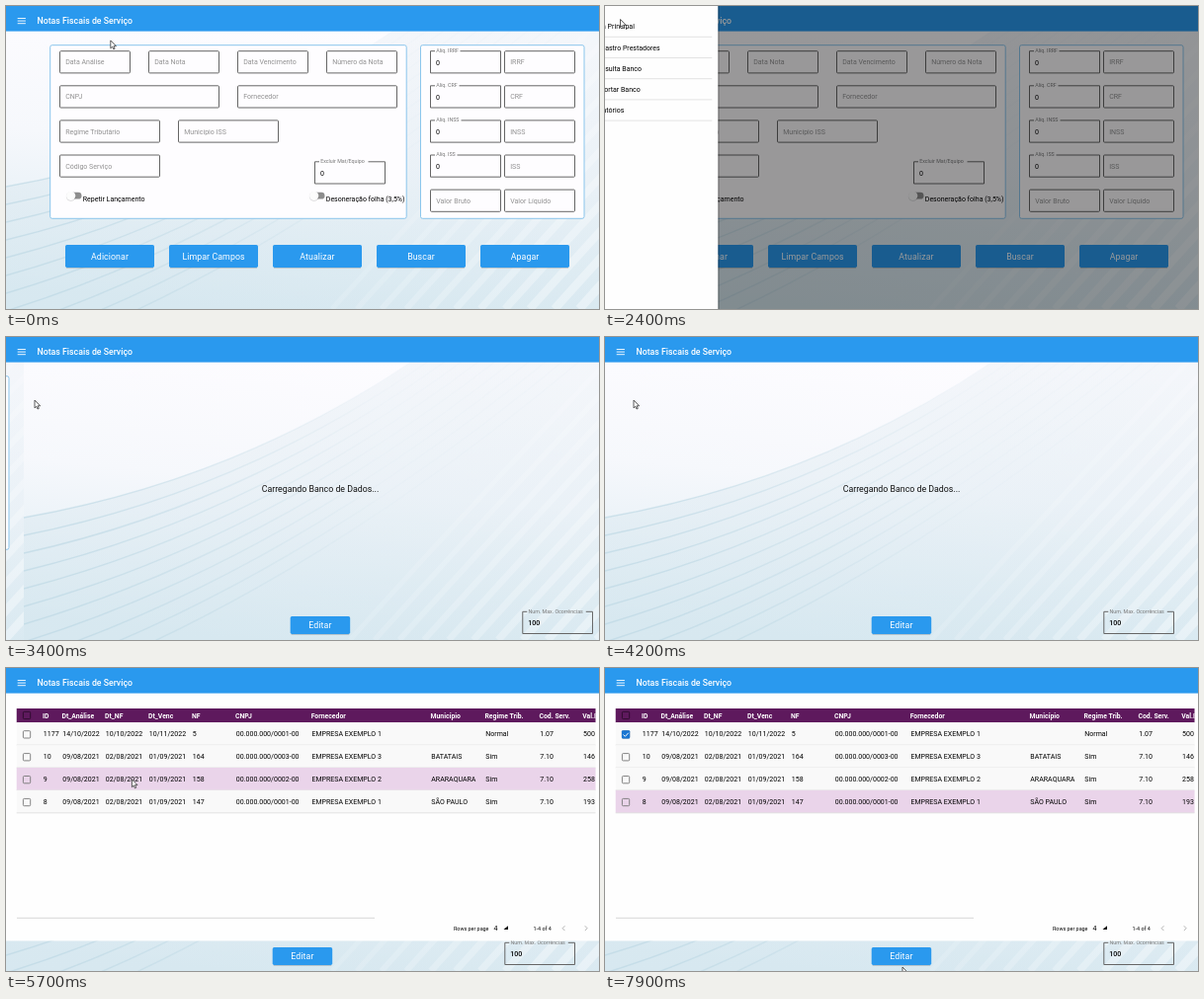
These frames come from a looping animation (600x307 px, 8000 ms). An HTML page:

```html
<!DOCTYPE html>
<html lang="pt-BR">
<head>
<meta charset="utf-8">
<title>Notas Fiscais de Serviço</title>
<style>
  html, body { margin: 0; width: 100%; height: 100%; overflow: hidden; background: #fff; }
  svg { display: block; width: 600px; height: 307px; font-family: Roboto, sans-serif; font-size: 7.03px; cursor: default; }
  .panel { fill: #fefdff; stroke: #7fc0ea; stroke-width: .9; }
  .field { fill: none; stroke: #666; }
  .hint { fill: #929292; }
  .label { fill: #777; font-size: 5.3px; }
  .button rect { fill: #2a99ee; }
  .button.over rect { fill: #1d6fb0; }
  .button text { fill: #fff; font-size: 8.8px; letter-spacing: .08px; text-anchor: middle; }
  .head { fill: #fff; font-size: 6.85px; font-weight: 700; }
  .row.over .fill { fill: #ead4ea; }
  .row .fill { fill: #f9f9f9; }
  .box { fill: none; stroke: #777; stroke-width: .9; }
  .small { font-size: 5.4px; }
</style>
</head>
<body>
<svg id="stage" viewBox="0 0 600 307"></svg>
<script>
const LOOP = 8000, DRAWER = 143, OPEN = 2300, LEAVE = 3200, LOADED = 4400, CHECKED = 7300;

const range = (n, f) => Array.from({ length: n }, (_, i) => f(i)).join('');
const text = (x, y, s, cls = '') => `<text x="${x}" y="${y}" class="${cls}">${s}</text>`;
const rect = (x, y, w, h, fill, extra = '') =>
  `<rect x="${x}" y="${y}" width="${w}" height="${h}" fill="${fill}" ${extra}/>`;
const rowY = i => 45.7 + i * 35.1;

const hintField = (x, y, w, hint) =>
  `<rect class="field" x="${x}" y="${y}" width="${w}" height="22.2" rx="1"/>` + text(x + 5.7, y + 13.6, hint, 'hint');

// Outlined field whose top border leaves a gap for the label.
const valueField = (x, y, w, label, gap, value, weight = 400) =>
  `<path class="field" d="M${x + gap + 7} ${y}H${x + w}V${y + 22.2}H${x}V${y}H${x + 4.5}"/>` +
  text(x + 5.7, y + 1.3, label, 'label') +
  `<text x="${x + 5.5}" y="${y + 14}" font-weight="${weight}">${value}</text>`;

const button = (x, y, w, h, label) =>
  `<g class="button" data-box="${[x, y, x + w, y + h]}">
    <path d="M${x + 1} ${y + h + .3}h${w - 2}" stroke="#000" stroke-opacity=".2"/>
    <rect x="${x}" y="${y}" width="${w}" height="${h}" rx="1.7"/>${text(x + w / 2, y + h / 2 + 3.2, label)}</g>`;

const toggle = (x, label) =>
  rect(x + 1, 188.8, 14, 6.8, '#8d8d8d', 'rx="3.4"') +
  `<circle cx="${x + 4.2}" cy="193" r="4.9" fill="#000" opacity=".12"/>
   <circle cx="${x + 4.2}" cy="192.3" r="4.6" fill="#fcfcfc"/>` + text(x + 16.3, 197.6, label);

function backdrop() {
  const bands = range(16, i => {
    const x = 330 + i * 25;
    return `<path d="M${x} 307Q${x + 105} 190 ${x + 260} 25" stroke="#fff" stroke-width="${5 + i * .4}" opacity="${.12 + i * .025}"/>`;
  });
  const curves = range(11, i => {
    const y = 183 + i * 18;
    const d = `M0 ${y}Q${215 + i * 6} ${y - 38 - i * 6} ${392 + i * 17} 25`;
    return `<path d="${d}" stroke="#bcd8e3" stroke-width="1.4" opacity=".65"/>`;
  });
  return `<g id="bg" clip-path="url(#body)">${rect(0, 25, 600, 282, 'url(#sky)')}
    <path d="M0 183Q215 145 392 25H600V307H0Z" fill="url(#haze)"/>
    <g fill="none"><g clip-path="url(#below)">${bands}</g><g mask="url(#fade)">${curves}</g></g></g>`;
}

function form() {
  const fields = [
    [54.5, 0, 71, 'Data Análise'], [144.5, 0, 71, 'Data Nota'],
    [234.5, 0, 71, 'Data Vencimento'], [324.5, 0, 71, 'Número da Nota'],
    [54.5, 1, 161, 'CNPJ'], [234.5, 1, 161, 'Fornecedor'],
    [54.5, 2, 101, 'Regime Tributário'], [174.5, 2, 101, 'Município ISS'],
    [54.5, 3, 101, 'Código Serviço'],
    [429.5, 4, 71, 'Valor Bruto'], [504.5, 4, 71, 'Valor Líquido']
  ];
  const taxes = [['IRRF', 23], ['CRF', 22], ['INSS', 24], ['ISS', 20]];
  return `<use href="#bg"/>
    <rect class="panel" x="44.7" y="39.7" width="360.5" height="175.6" rx="2"/>
    <rect class="panel" x="419.5" y="39.7" width="165.5" height="175.6" rx="2"/>` +
    fields.map(([x, row, w, hint]) => hintField(x, rowY(row), w, hint)).join('') +
    taxes.map(([name, gap], i) =>
      valueField(429.5, rowY(i), 71, 'Alíq. ' + name, gap, '0') + hintField(504.5, rowY(i), 71, name)).join('') +
    valueField(312.5, 157.8, 71, 'Excluir Mat/Equipo', 47, '0') +
    toggle(61.5, 'Repetir Lançamento') + toggle(307.5, 'Desoneração folha (3,5%)') +
    ['Adicionar', 'Limpar Campos', 'Atualizar', 'Buscar', 'Apagar']
      .map((s, i) => button(60 + i * 105, 242, 90, 23, s)).join('');
}

function table() {
  const cols = [37, 56.5, 100, 144, 188, 232, 308.7, 429.5, 484.5, 539.5, 583.3];
  const heads = 'ID,Dt_Análise,Dt_NF,Dt_Venc,NF,CNPJ,Fornecedor,Município,Regime Trib.,Cod. Serv.,Val.Bruto'.split(',');
  const rows = [
    '1177,14/10/2022,10/10/2022,10/11/2022,5,1,1,,Normal,1.07,500',
    '10,09/08/2021,02/08/2021,01/09/2021,164,3,3,BATATAIS,Sim,7.10,146',
    '9,09/08/2021,02/08/2021,01/09/2021,158,2,2,ARARAQUARA,Sim,7.10,258',
    '8,09/08/2021,02/08/2021,01/09/2021,147,1,1,SÃO PAULO,Sim,7.10,193'
  ];
  const body = rows.map((line, r) => {
    const y = 55.2 + r * 22.9;
    const cells = line.split(',').map((v, c) => {
      const s = c === 5 ? `00.000.000/000${v}-00` : c === 6 ? `EMPRESA EXEMPLO ${v}` : v;
      return text(cols[c] + .8, y + 13.9, s);
    }).join('');
    return `<g class="row"><rect class="fill" x="10.5" y="${y}" width="586.5" height="22.9"/>
      <path d="M10.5 ${y + 22.9}H597" stroke="#dedede" stroke-width=".8"/>
      <rect class="box" x="17.4" y="${y + 8.5}" width="7.3" height="7.3" rx="1"/>${cells}</g>`;
  }).join('');
  return rect(0, 25, 600, 251.5, '#fefefe') +
    `<g clip-path="url(#cells)">${rect(10.5, 41, 586.5, 14.2, '#5e195d')}
      <rect class="box" style="stroke:#2b0b2b" x="17.4" y="44.3" width="7.3" height="7.3" rx="1"/>
      ${heads.map((s, c) => text(cols[c], 51, s, 'head')).join('')}${body}</g>
    <g id="tick">${rect(16.9, 63.2, 8.3, 8.3, '#1976d2', 'rx="1"')}
      <path d="M18.6 67.5l1.8 1.8 3.4-3.6" fill="none" stroke="#fff"/></g>
    <path d="M11 253.3H373" stroke="#cfcfcf" stroke-width=".8"/>` +
    text(453, 265.8, 'Rows per page', 'small') + text(493.6, 266.3, '4') +
    text(533.5, 265.8, '1-4 of 4', 'small') +
    `<path d="M503.5 265L508 261.2V265Z"/>
    <path d="M565.4 261.3l-2.3 2.4 2.3 2.4M585.8 261.3l2.3 2.4-2.3 2.4" fill="none" stroke="#aaa" stroke-width=".9"/>`;
}

const menu = ['Tela Principal', 'Cadastro Prestadores', 'Consulta Banco', 'Exportar Banco', 'Relatórios'];

document.getElementById('stage').innerHTML = `
  <defs>
    <linearGradient id="sky" x1=".6" y1="0" x2=".4" y2="1">
      <stop offset="0" stop-color="#fdfcff"/><stop offset=".45" stop-color="#f6f8fc"/><stop offset="1" stop-color="#dcebf2"/>
    </linearGradient>
    <linearGradient id="haze" x2="0" y2="1">
      <stop offset="0" stop-color="#dfe9f0" stop-opacity=".3"/><stop offset="1" stop-color="#d2e5ee" stop-opacity=".5"/>
    </linearGradient>
    <linearGradient id="ramp"><stop offset=".1" stop-color="#fff"/><stop offset=".6" stop-color="#111"/></linearGradient>
    <mask id="fade" maskUnits="userSpaceOnUse" x="0" y="0" width="600" height="420">${rect(0, 0, 600, 420, 'url(#ramp)')}</mask>
    <clipPath id="body">${rect(0, 25, 600, 282, '#000')}</clipPath>
    <clipPath id="below"><path d="M0 183Q215 145 392 25H600V307H0Z"/></clipPath>
    <clipPath id="cells">${rect(10.5, 41, 586, 107, '#000')}</clipPath>
    ${backdrop()}
  </defs>
  <g id="form">${form()}</g>
  <g id="list"><use href="#bg"/>
    <text id="loading" x="300" y="156.8" font-size="8.8" text-anchor="middle" fill="#111">Carregando Banco de Dados...</text>
    ${valueField(504.8, 278.3, 70.7, 'Num. Max. Ocorrências', 57, '100', 500)}
    ${button(269.7, 283, 60.5, 18, 'Editar')}
    <g id="table">${table()}</g>
  </g>
  ${rect(0, 0, 600, 25.6, '#2a99ee')}
  <path d="M11.7 12.5h8.2m-8.2 2.6h8.2m-8.2 2.6h8.2" stroke="#fff" stroke-width=".9"/>
  <text x="31.5" y="18" fill="#fff" font-size="8.75" font-weight="500">Notas Fiscais de Serviço</text>
  <rect id="shade" width="600" height="307"/>
  <g id="drawer">
    ${rect(0, 0, DRAWER + 1.5, 307, '#000', 'opacity=".2"')}${rect(0, 0, DRAWER, 307, '#fefefe')}
    ${menu.map((s, i) => text(16.5, 23.3 + i * 21.2, s) +
      `<path d="M6 ${31.3 + i * 21.2}H${DRAWER - 6}" stroke="#dcdcdc" stroke-width=".8"/>`).join('')}
  </g>
  <path id="cursor" d="M0 0V7.9L1.8 6.3 3 9 4.3 8.4 3.1 5.8H5.6Z" fill="#fff" stroke="#333" stroke-width=".8"/>`;

const el = Object.fromEntries(['form', 'list', 'loading', 'table', 'tick', 'shade', 'drawer', 'cursor']
  .map(id => [id, document.getElementById(id)]));
const buttons = [...document.querySelectorAll('.button')]
  .map(node => ({ node, box: node.dataset.box.split(',').map(Number) }));
const rows = [...document.querySelectorAll('.row')];

// [time, x, y]
const path = [
  [0, 106, 35], [180, 74, 19], [380, 300, 60], [580, 579, 110], [750, 500, 235], [900, 370, 247],
  [1320, 370, 247], [1700, 235, 140], [2000, 60, 40], [2200, 14, 16], [2400, 15.5, 13.5], [2600, 17, 22],
  [3080, 29, 64], [4350, 29, 64], [4900, 132, 115], [5250, 138, 119],
  [5700, 127, 113], [5950, 230, 62], [6600, 506, 65], [6720, 506, 65], [6860, 260, 52],
  [7000, 24, 67], [7500, 24, 67], [7880, 301, 303], [LOOP, 301, 303]
];
// [time, highlighted row]
const hovers = [[LOADED, 0], [4540, 1], [4760, 2], [5780, 1], [5890, 0], [7580, 1], [7660, 2], [7740, 3]];

const clamp = v => Math.min(1, Math.max(0, v));

function cursorAt(t) {
  const i = path.findIndex(p => p[0] > t);
  const [t0, x0, y0] = path[i - 1], [t1, x1, y1] = path[i];
  const k = (t - t0) / (t1 - t0);
  return [x0 + (x1 - x0) * k, y0 + (y1 - y0) * k];
}

// cubic-bezier(0, 0, .2, 1)
function decelerate(x) {
  let lo = 0, hi = 1;
  for (let i = 0; i < 20; i++) {
    const s = (lo + hi) / 2;
    if (.6 * s * s + .4 * s ** 3 < x) lo = s; else hi = s;
  }
  return 3 * lo * lo - 2 * lo ** 3;
}

const show = (node, on) => node.style.display = on ? '' : 'none';
const move = (node, x, y = 0) => node.setAttribute('transform', `translate(${x.toFixed(2)} ${y.toFixed(2)})`);

function draw(t) {
  const slide = t < LEAVE ? 600 : 600 * Math.exp((LEAVE - t) * .01745);
  const loaded = t >= LOADED;
  move(el.form, slide - 600);
  move(el.list, slide < .3 ? 0 : slide);
  show(el.form, slide > .3);
  show(el.list, slide < 600);
  show(el.loading, !loaded);
  show(el.table, loaded);
  show(el.tick, t >= CHECKED);

  const open = decelerate(clamp((t - OPEN) / 225)) * (1 - decelerate(clamp((t - LEAVE) / 195)));
  move(el.drawer, (open - 1) * DRAWER);
  show(el.drawer, open > .001);
  el.shade.setAttribute('opacity', open * .5);

  const [x, y] = cursorAt(t);
  move(el.cursor, x, y);
  for (const { node, box: [l, top, r, b] } of buttons) {
    const shown = node.parentNode === (t < LEAVE ? el.form : el.list);
    node.classList.toggle('over', shown && x > l && x < r && y > top && y < b);
  }
  const hover = hovers.filter(h => h[0] <= t).pop()?.[1];
  rows.forEach((row, i) => row.classList.toggle('over', i === hover));
}

const start = performance.now();
function tick() {
  draw((performance.now() - start) % LOOP);
  requestAnimationFrame(tick);
}
tick();
</script>
</body>
</html>
```
